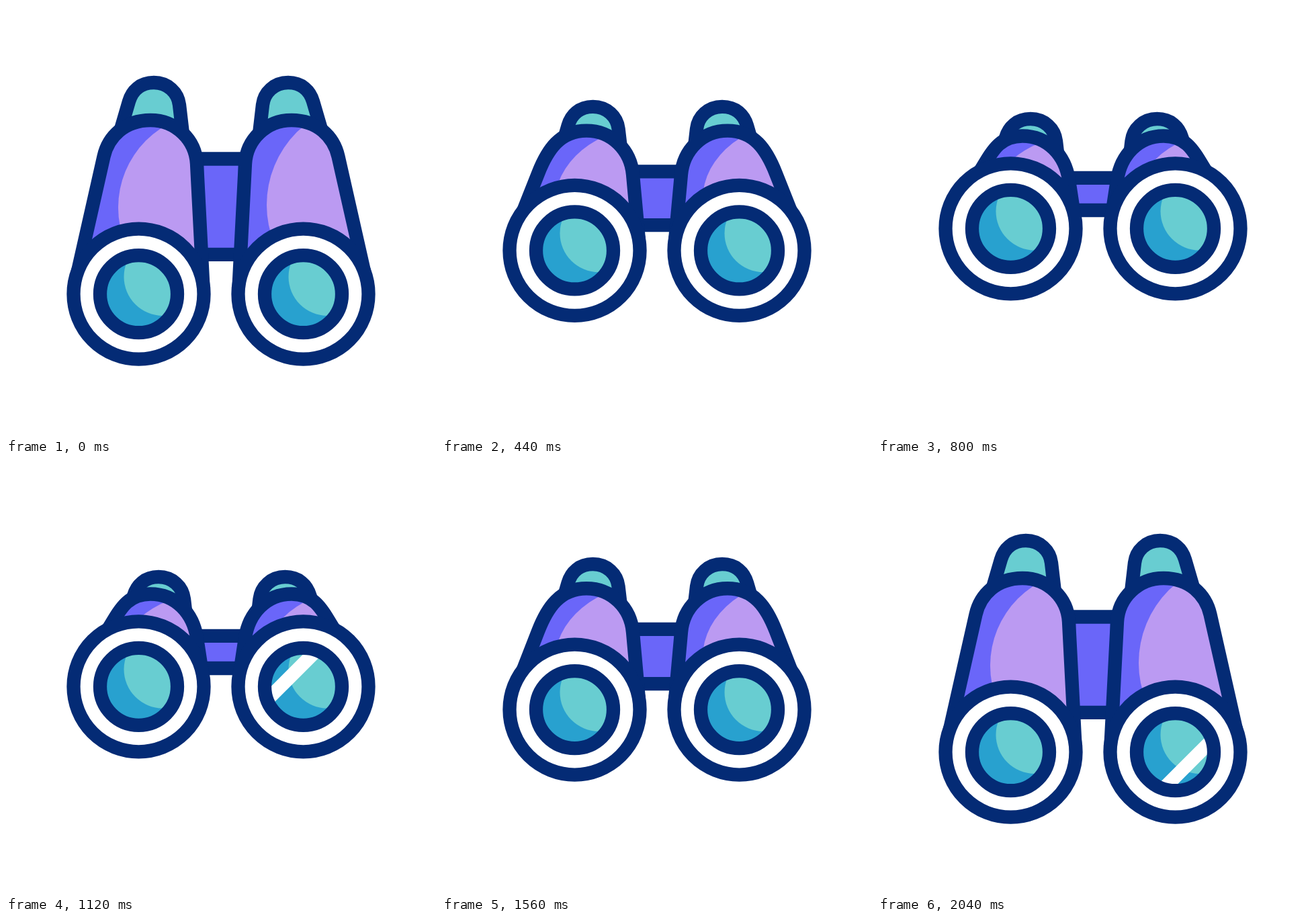
Recreate the animation shown at these times as an HTML page with a canvas. Size 640x640 px, loop 2200 ms.

```html
<!DOCTYPE html>
<html>
<head>
<meta charset="utf-8">
<style>
html, body { margin: 0; width: 100%; height: 100%; overflow: hidden; background: #fff; }
canvas { display: block; width: 640px; height: 640px; }
</style>
</head>
<body>
<canvas id="stage" width="640" height="640"></canvas>
<script>
const ctx = document.getElementById('stage').getContext('2d');
const LOOP = 2200, SIZE = 640;
const NAVY = '#042b75', VIOLET = '#6a66f9', LILAC = '#bb9af2', TEAL = '#68cdd1', BLUE = '#28a1cf';

const mix = (a, b, p) => a + (b - a) * p;
const smooth = u => u * u * (3 - 2 * u);
const progress = (t, start, length) => Math.min(1, Math.max(0, (t - start) / length));

// Cubic bezier easing (.4, 0, .2, 1), solved by bisection
function ease(u) {
  let lo = 0, hi = 1;
  for (let i = 0; i < 24; i++) {
    const s = (lo + hi) / 2, r = 1 - s;
    if (1.2 * r * r * s + 0.6 * r * s * s + s * s * s < u) lo = s; else hi = s;
  }
  return smooth(lo);
}

// Point that continues the leg from base past shoulder, part of the way up to the apex
function legControl(base, shoulder, apex) {
  const k = 0.55 * (shoulder.y - apex.y) / (base.y - shoulder.y);
  return { x: shoulder.x + k * (shoulder.x - base.x), y: shoulder.y + k * (shoulder.y - base.y) };
}

// Two straight legs joined by a rounded top
function dome(baseL, left, apex, right, baseR) {
  const path = new Path2D();
  const a = legControl(baseL, left, apex), b = legControl(baseR, right, apex);
  path.moveTo(baseL.x, baseL.y);
  path.lineTo(left.x, left.y);
  path.bezierCurveTo(a.x, a.y, mix(apex.x, left.x, 0.55), apex.y, apex.x, apex.y);
  path.bezierCurveTo(mix(apex.x, right.x, 0.55), apex.y, b.x, b.y, right.x, right.y);
  path.lineTo(baseR.x, baseR.y);
  return path;
}

function mirror(path) {
  const flipped = new Path2D();
  flipped.addPath(path, new DOMMatrix([-1, 0, 0, 1, SIZE, 0]));
  return flipped;
}

function ellipse(x, y, rx, ry = rx) {
  const path = new Path2D();
  path.ellipse(x, y, rx, ry, 0, 0, 2 * Math.PI);
  return path;
}

function fill(path, color) {
  ctx.fillStyle = color;
  ctx.fill(path);
}

// Fill, decorate within the shape, then outline
function paint(path, color, decorate) {
  fill(path, color);
  if (decorate) {
    ctx.save();
    ctx.clip(path);
    decorate();
    ctx.restore();
  }
  ctx.stroke(path);
}

function eyepiece(p, drift) {
  const apex = { x: 220 + drift * p, y: mix(114, 168, p) };
  const from = (dx, dy) => ({ x: apex.x + dx, y: apex.y + dy });
  return dome(from(-51, 76), from(-37, 28), apex, from(38, 33), from(43, 76));
}

function body(p, lensX, lensY) {
  const apex = { x: 215, y: mix(170, 193.5, p) };
  const left = { x: mix(145.5, 142, p), y: apex.y + mix(54, 68, p) };
  const right = { x: 284, y: apex.y + 65 };
  const base = dx => ({ x: lensX + dx, y: lensY - 10 });
  return dome(base(-96), left, apex, right, base(96));
}

function drawBridge(p) {
  const path = new Path2D(), top = mix(227.5, 255.8, p);
  path.rect(284, top, 72, mix(369.8, 304, p) - top);
  paint(path, VIOLET);
}

// Diagonal band centred on the line x + y = sum
function drawGlint(sum) {
  ctx.strokeStyle = '#fff';
  ctx.beginPath();
  ctx.moveTo(sum, 0);
  ctx.lineTo(sum - SIZE, SIZE);
  ctx.stroke();
}

function drawBarrel({ flip, drift, light }, p, glint) {
  const place = flip ? mirror : path => path;
  const lensX = 197.5, x = flip ? SIZE - lensX : lensX, y = mix(428.7, 331.3, p);

  paint(place(eyepiece(p, drift)), TEAL);
  paint(place(body(p, lensX, y)), VIOLET, () => {
    const { cx, r, cy, tiltR, tiltY } = light;
    fill(ellipse(cx, mix(cy, tiltY, p), r, mix(r, tiltR, p)), LILAC);
  });
  paint(ellipse(x, y, 97), '#fff');
  paint(ellipse(x, y, 57.5), BLUE, () => {
    fill(ellipse(x + 36, y - 25.7, 58), TEAL);
    drawGlint(glint);
  });
}

const BARRELS = [
  { flip: false, drift: 7, light: { cx: 308, r: 141, cy: 300, tiltR: 105, tiltY: 296 } },
  { flip: true, drift: 4.5, light: { cx: 541, r: 153, cy: 296, tiltR: 100, tiltY: 283 } }
];

function draw(t) {
  const p = ease(progress(t, 220, 518)) - ease(progress(t, 1408, 520));
  const glint = mix(412, 908, smooth(progress(t, 780, 560)));
  ctx.fillStyle = '#fff';
  ctx.fillRect(0, 0, SIZE, SIZE);
  ctx.strokeStyle = NAVY;
  ctx.lineWidth = 20.3;
  drawBridge(p);
  for (const barrel of BARRELS) drawBarrel(barrel, p, glint);
}

function tick() {
  draw(performance.now() % LOOP);
  requestAnimationFrame(tick);
}
tick();
</script>
</body>
</html>
```
